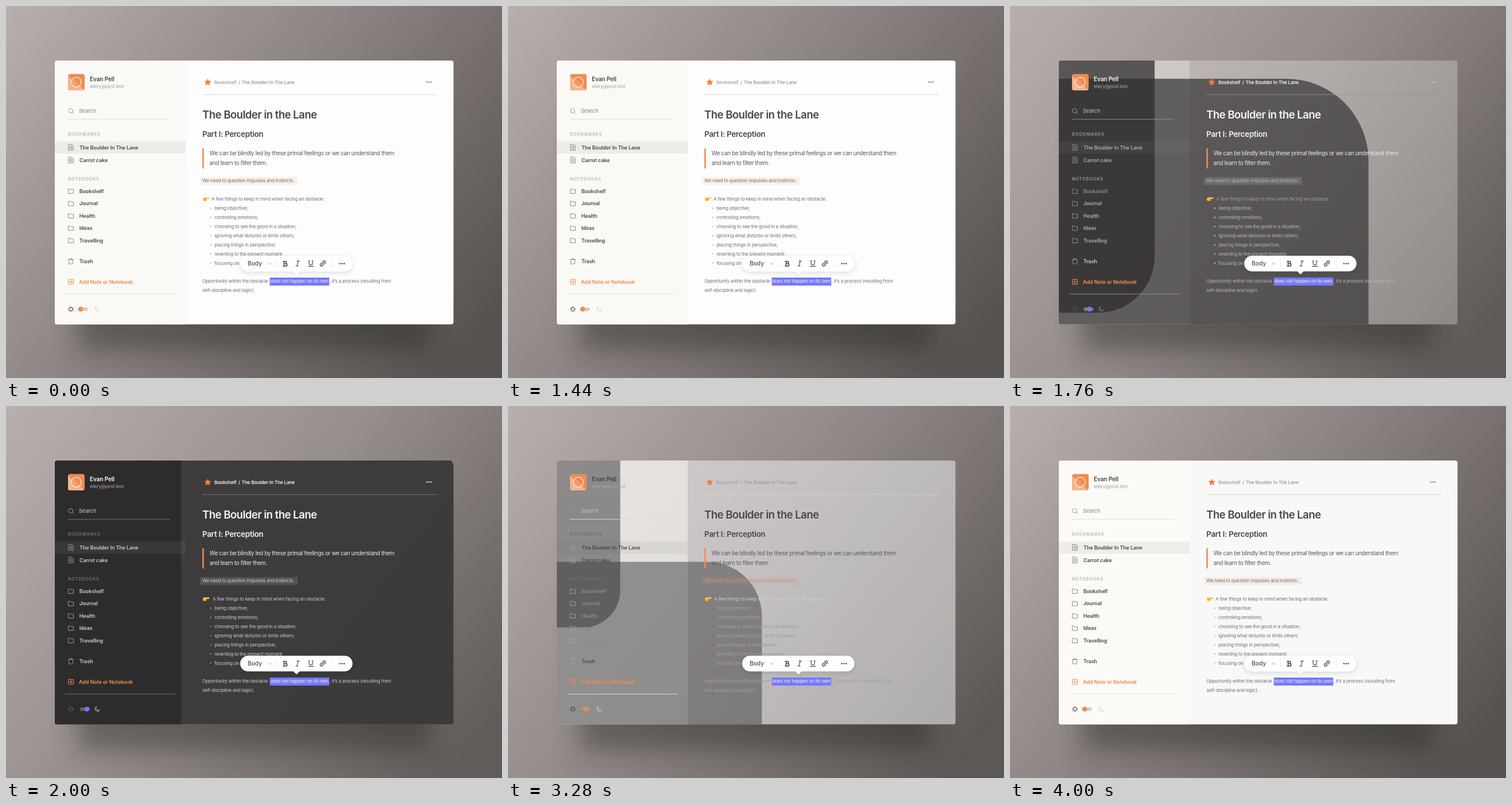
An HTML page that plays this animation: 864 by 648 pixels, repeating every 4080 ms.

```html
<!DOCTYPE html>
<html lang="en">
<head>
<meta charset="utf-8">
<title>Notes app, light and dark</title>
<style>
html, body { margin: 0; width: 100%; height: 100%; overflow: hidden; background: #8b8380; }
svg { display: block; width: 100%; height: 100%; }
text { font-family: Inter, "Open Sans", sans-serif; white-space: pre; }
.user { font-size: 10px; font-weight: 600; letter-spacing: -.1px; }
.mail { font-size: 8px; letter-spacing: -.17px; }
.find { font-size: 9.2px; font-weight: 500; letter-spacing: -.1px; }
.label { font-size: 7.5px; font-weight: 600; letter-spacing: .82px; }
.item { font-size: 9px; font-weight: 600; letter-spacing: -.13px; }
.crumb { font-size: 8.2px; font-weight: 600; letter-spacing: -.15px; }
.title { font-size: 18.5px; font-weight: 600; letter-spacing: -.5px; }
.part { font-size: 13.3px; font-weight: 600; letter-spacing: -.24px; }
.quote { font-size: 10px; letter-spacing: -.38px; }
.body { font-size: 8.2px; letter-spacing: -.23px; }
.tool { font-size: 10.2px; font-weight: 500; }
.icon { fill: none; stroke-width: .9; stroke-linejoin: round; stroke-linecap: round; }
</style>
</head>
<body>
<svg id="stage" viewBox="0 0 864 648" preserveAspectRatio="none">
  <defs>
    <linearGradient id="dayWall" gradientUnits="userSpaceOnUse" x1="0" y1="0" x2="790" y2="620">
      <stop stop-color="#b9afac"/><stop offset=".5" stop-color="#8a8280"/><stop offset="1" stop-color="#57524f"/>
    </linearGradient>
    <linearGradient id="nightWall" gradientUnits="userSpaceOnUse" x1="0" y1="0" x2="790" y2="620">
      <stop stop-color="#b9afac"/><stop offset=".5" stop-color="#978f8c"/><stop offset="1" stop-color="#625d5a"/>
    </linearGradient>
    <clipPath id="window"><rect x="85" y="95" width="694.5" height="459.5" rx="4"/></clipPath>
    <clipPath id="outside"><path clip-rule="evenodd" d="M0 0H864V648H0ZM85 95V554.5H779.5V95Z"/></clipPath>
    <filter id="soft" x="-20%" y="-20%" width="140%" height="140%"><feGaussianBlur stdDeviation="23"/></filter>
    <filter id="lift" x="-20%" y="-60%" width="140%" height="240%">
      <feDropShadow dx="0" dy="2" stdDeviation="4" flood-color="#000" flood-opacity=".14"/>
    </filter>
    <clipPath id="face"><rect x="108" y="118.5" width="29" height="28.5" rx="4"/></clipPath>
  </defs>
  <rect width="864" height="648" fill="url(#dayWall)"/>
  <rect id="night" width="864" height="648" fill="url(#nightWall)"/>
  <g clip-path="url(#outside)">
    <rect x="124" y="180" width="616" height="420" fill="#1f1a18" opacity=".4" filter="url(#soft)"/>
  </g>
  <g clip-path="url(#window)">
    <rect id="mainLight" x="85" y="95" width="695" height="460"/>
    <rect id="sideLight" x="85" y="95" width="228" height="460"/>
    <rect id="rowLight" x="85" y="236" width="228" height="21.5"/>
    <path id="mainDark" fill="#3b393a"/>
    <path id="sideDark" fill="#2d2b2c"/>
    <rect id="rowDark" x="85" y="236" width="228" height="21.5" fill="#fff"/>
  </g>
  <g clip-path="url(#face)">
    <rect x="108" y="118" width="30" height="30" fill="#ee8c54"/>
    <path d="M108 122L137 147H108Z" fill="#f4b48c"/>
    <circle cx="122.5" cy="132.7" r="8.6" fill="#ee8c54" fill-opacity=".55" stroke="#fff3ea" stroke-width="1.3"/>
    <path d="M116.5 127L128.5 138.6" stroke="#f8cdb2" stroke-width=".8"/>
  </g>
  <g id="page"></g>
  <g id="hand">
    <rect x="343" y="333.6" width="6.4" height="6" rx="2.2" fill="#fbb92f"/>
    <rect x="346" y="333.5" width="8.6" height="2.4" rx="1.2" fill="#fcc748"/>
    <path d="M346.6 336.5h3.4m-3.2 1.6h2.8" stroke="#d98a17" stroke-width=".6" stroke-linecap="round"/>
  </g>
  <rect x="342" y="248" width="2.6" height="35" fill="#ee8c54"/>
  <path id="star" fill="#ee8040" stroke="#ee8040" stroke-linejoin="round"/>
  <rect x="459.5" y="473" width="103.5" height="14" fill="#7777fa"/>
  <text class="body" x="460.5" y="482.4" fill="#f1f0ff">does not happen on its own</text>
  <g class="icon" stroke="#ee8c54">
    <rect x="108.8" y="476.2" width="8.6" height="8.6" rx="1" stroke-width="1.1"/>
    <path d="M113.1 478.4v4.2M111 480.5h4.2" stroke-width="1.2"/>
  </g>
  <text class="item" x="127" y="483.6" fill="#ee8c54">Add Note or Notebook</text>
  <path filter="url(#lift)" fill="#fefefe" d="M421.5 435H590a13.6 13.6 0 0 1 0 27.2H511.5L506 467.6L500.5 462.2H421.5a13.6 13.6 0 0 1 0-27.2Z"/>
  <text class="tool" x="421" y="452.4" fill="#4b4949">Body</text>
  <g class="icon" stroke="#454343">
    <path d="M456.4 447.7l2.6 2.6l2.6-2.6" stroke="#8a8888"/>
    <path d="M471.5 442v13M568.5 442v13" stroke="#e8e7e7" stroke-width=".8"/>
    <path stroke-width="1.5" d="M482.8 444.7h4a2 2 0 0 1 0 4h-2.4h3a2.2 2.2 0 0 1 0 4.4h-4.6M484.4 444.7v8.4"/>
    <path stroke-width="1.1" d="M506.8 444.4h4.2M504.8 453h4.2M509 444.4l-2.1 8.6"/>
    <path stroke-width="1.1" d="M528 444v4.2a3 3 0 0 0 6 0V444M526.8 444h2.4M532.8 444h2.4M526.6 453.6h9"/>
    <path stroke-width="1.2" transform="rotate(-45 552 448.6)" d="M551 446.3h-2.2a2.3 2.3 0 0 0 0 4.6h2.2M553 446.3h2.2a2.3 2.3 0 0 1 0 4.6H553M549.6 448.6h4.8"/>
  </g>
  <g fill="#454343"><circle cx="581.7" cy="448.7" r="1.25"/><circle cx="585.4" cy="448.7" r="1.25"/><circle cx="589.1" cy="448.7" r="1.25"/></g>
  <circle id="knob" cy="528" r="4.3"/>
</svg>
<script>
const LOOP = 4080, TO_DARK = 1491, TO_LIGHT = 3118, SPAN = 760;
const $ = id => document.getElementById(id);
const page = $('page');
const tinted = [];

const clamp = v => Math.max(0, Math.min(1, v));
const ease = v => 1 - (1 - clamp(v)) ** 3;
const lerp = (a, b, k) => a + (b - a) * k;
const rgb = hex => [1, 3, 5].map(i => parseInt(hex.slice(i, i + 2), 16));
const blend = (a, b, k) => `rgb(${a.map((v, i) => Math.round(lerp(v, b[i], k)))})`;

// How a tint follows the switch: mixed evenly, early (snap) or late (hold).
const pace = { m: k => k, s: k => clamp(k * 4), h: k => clamp(2 * k - 1) };

// The two letters of mode are the paces towards dark and back to light.
function add(tag, attrs, light, dark, mode = 'mm', prop = 'fill') {
  const el = document.createElementNS('http://www.w3.org/2000/svg', tag);
  for (const key in attrs) el.setAttribute(key, attrs[key]);
  page.append(el);
  tinted.push({ el, prop, mode, light: rgb(light), dark: rgb(dark) });
  return el;
}
function text(cls, x, y, str, light, dark, mode) {
  const el = add('text', { class: cls, x, y }, light, dark, mode);
  el.textContent = str;
  return el;
}
const icon = (d, x, y, light, dark, mode) =>
  add('path', { class: 'icon', d, transform: `translate(${x} ${y})` }, light, dark, mode, 'stroke');
const rule = (x1, x2, y, light, dark) =>
  add('path', { d: `M${x1} ${y}H${x2}`, 'stroke-width': .9 }, light, dark, 'ms', 'stroke');

const DOC = 'M-4-5H2L4-3V5H-4ZM-2-2H2M-2 .2H2M-2 2.4H2';
const FOLDER = 'M-4.5-3.5Q-4.5-4-4-4H-1.3L-.2-2.7H4Q4.5-2.7 4.5-2.2V3.5Q4.5 4 4 4H-4Q-4.5 4-4.5 3.5Z';
const TRASH = 'M-4.5-3H4.5M-1.5-3V-4.5H1.5V-3M-3.6-3V4Q-3.6 4.7-2.9 4.7H2.9Q3.6 4.7 3.6 4V-3';
const LENS = 'M2.8 2.8L4.8 4.8M3.7 0A3.7 3.7 0 1 1-3.7 0A3.7 3.7 0 1 1 3.7 0';
const TITLE = 'The Boulder In The Lane';

// Sidebar
text('user', 146, 131, 'Evan Pell', '#444241', '#ffffff', 'ss');
text('mail', 146, 143.2, 'ellery@post.test', '#a5a3a1', '#a9a7a7');
icon(LENS, 112.5, 182.5, '#8f8d8b', '#aaa8a8', 'ss');
text('find', 127, 186.3, 'Search', '#969492', '#bcbaba', 'mh');
rule(108, 286, 197.3, '#dfddd9', '#777575');
text('label', 108, 226.2, 'BOOKMARKS', '#b9b7b4', '#706e6e', 'hh');
text('label', 108, 304.2, 'NOTEBOOKS', '#b9b7b4', '#706e6e', 'hh');
[TITLE, 'Carrot cake'].forEach((name, i) => {
  const y = 246.3 + 22 * i;
  icon(DOC, 113.2, y, '#7d7b79', '#a3a1a1', 'mh');
  text('item', 128, y + 3.2, name, '#4b4948', '#cfcdcd', 'ms');
});
['Bookshelf', 'Journal', 'Health', 'Ideas', 'Travelling'].forEach((name, i) => {
  const y = 322.5 + 21.5 * i, mode = i ? 'm' : 'h';
  icon(FOLDER, 113, y, '#7d7b79', '#acaaaa', mode + 'h');
  text('item', 127.7, y + 3.2, name, '#4b4948', '#d2d0d0', mode + 'm');
});
icon(TRASH, 113, 444.5, '#7d7b79', '#a3a1a1', 'mh');
text('item', 127.7, 447.6, 'Trash', '#4b4948', '#cfcdcd', 'ss');
rule(103, 296, 501.8, '#e6e4e0', '#777575');

let rays = 'M3 0A3 3 0 1 1-3 0A3 3 0 1 1 3 0';
for (let i = 0; i < 8; i++) {
  const c = Math.cos(i * Math.PI / 4), s = Math.sin(i * Math.PI / 4);
  rays += `M${3.4 * c} ${3.4 * s}L${4.7 * c} ${4.7 * s}`;
}
icon(rays, 113, 528.2, '#3d3b3a', '#666464', 'hs');
const track = add('rect', { y: 524.9, width: 17, height: 6.4, rx: 3.2 }, '#d0cecb', '#605e5e');
const moon = icon('M-1.5-4.3A4.3 4.3 0 1 0 4.5 1.5A4.5 4.5 0 0 1-1.5-4.3Z', 158.5, 528.2, '#d3d1cd', '#e0dede');

// Page
text('crumb', 363, 136, 'Bookshelf', '#aaa8a7', '#f0efef', 'ss');
text('crumb', 404.7, 136, '/', '#9c9a99', '#f0efef', 'ss');
text('crumb', 410.5, 136, TITLE, '#a19f9e', '#f4f3f3', 'ss');
for (const x of [733.2, 736.8, 740.4]) add('circle', { cx: x, cy: 132.5, r: 1.2 }, '#858382', '#dddbdb');
rule(342, 751, 154.3, '#d6d5d4', '#7b7979');
text('title', 342, 196.3, 'The Boulder in the Lane', '#484646', '#f7f6f6', 'ss');
text('part', 342, 228.4, 'Part I: Perception', '#484646', '#f4f3f3', 'ss');
['We can be blindly led by these primal feelings or we can understand them', 'and learn to filter them.']
  .forEach((line, i) => text('quote', 354.5, 259.9 + 17.5 * i, line, '#5d5b5b', '#e9e8e8', 'ss'));
add('rect', { x: 338, y: 298, width: 170, height: 13.5, 'fill-opacity': .12 }, '#ee8c54', '#ffffff', 'ss');
const note = (x, y, str, mode) => text('body', x, y, str, '#737171', '#cfcece', mode);
note(342, 307.2, 'We need to question impulses and instincts.');
const lead = note(358, 339.3, 'A few things to keep in mind when facing an obstacle:', 'hh');
[
  'being objective;', 'controlling emotions;', 'choosing to see the good in a situation;',
  'ignoring what disturbs or limits others;', 'placing things in perspective;',
  'reverting to the present moment;', 'focusing on'
].forEach((line, i) => {
  const y = 352.2 + 15.93 * i;
  add('circle', { cx: 356.8, cy: y, r: 1.5 }, '#cfcdcd', '#706e6e', 'hh');
  note(363.3, y + 2.9, line);
});
note(342, 482.4, 'Opportunity within the obstacle');
note(563.6, 482.4, ', it’s a process (resulting from');
note(342, 498.2, 'self-discipline and logic).');

const tips = [];
for (let i = 0; i < 10; i++) {
  const r = i % 2 ? 2.6 : 5.6, a = i * Math.PI / 5;
  tips.push(`${351.4 + r * Math.sin(a)} ${133 - r * Math.cos(a)}`);
}
$('star').setAttribute('d', `M${tips.join('L')}Z`);

const set = (el, attrs) => { for (const key in attrs) el.setAttribute(key, attrs[key]); };

function draw(t) {
  const back = t >= TO_LIGHT;
  const k = ease((t - (back ? TO_LIGHT : TO_DARK)) / SPAN);
  const p = back ? 1 - k : k;

  for (const { el, prop, mode, light, dark } of tinted) {
    const step = pace[mode[+back]](k);
    el.setAttribute(prop, blend(light, dark, back ? 1 - step : step));
  }

  // Dark panels swell out of opposite left corners while they fade in.
  const w = 228 * p, h = 600 * p, r = 134 * p;
  set($('sideDark'), { opacity: p, d: `M85 95h${w}v${h - r}a${r} ${r} 0 0 1 ${-r} ${r}H85Z` });
  const W = 737 * p, H = 585 * p, R = 195 * p;
  set($('mainDark'), { opacity: p, d: `M85 555v${-H}h${W - R}a${R} ${R} 0 0 1 ${R} ${R}V555Z` });

  set($('night'), { opacity: p });
  set($('mainLight'), { opacity: 1 - p, fill: back ? '#f8f8f9' : '#fdfdfd' });
  set($('sideLight'), { opacity: 1 - p, fill: back ? '#fcfaf6' : '#fbf9f5' });
  set($('rowLight'), { opacity: p < 1 ? .05 : 0 });
  set($('rowDark'), { opacity: .06 * p });

  set(lead, { x: lerp(358, 360, p) });
  set(track, { x: lerp(125.5, 129, p) });
  set(moon, { opacity: back ? 1 : Math.abs(1 - 2 * p) });
  set($('knob'), { cx: lerp(130, 141.5, p), fill: (back ? k === 0 : k > 0) ? '#7777fa' : '#ee8c54' });
}

const start = performance.now();
function tick() {
  draw((performance.now() - start) % LOOP);
  requestAnimationFrame(tick);
}
tick();
</script>
</body>
</html>
```
